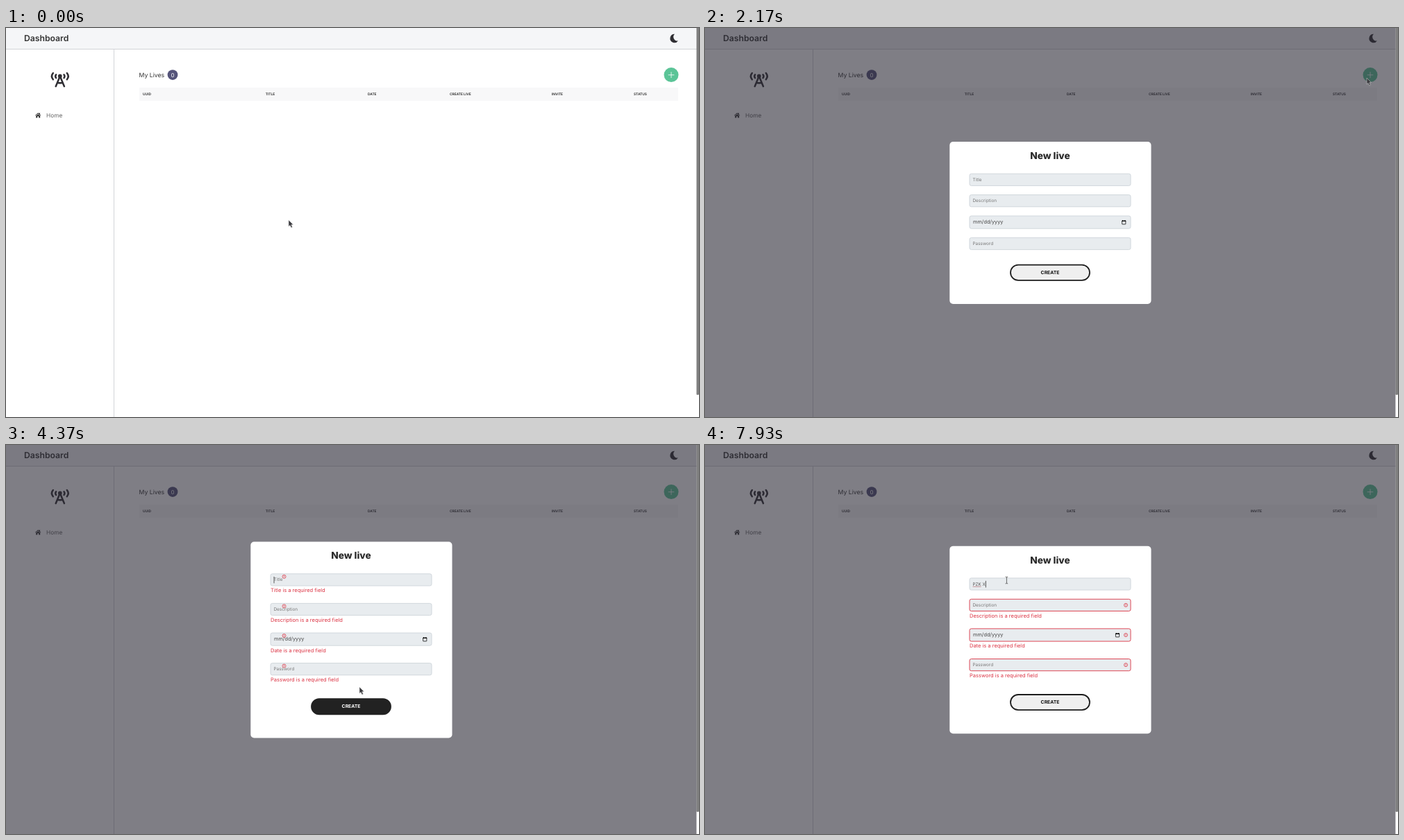
Animation of 998x561 px, one loop 8 s. Source, as an HTML page:

```html
<!DOCTYPE html>
<html lang="en">
<head>
<meta charset="utf-8">
<title>Dashboard</title>
<style>
  html, body { margin: 0; width: 100%; height: 100%; overflow: hidden; background: #fff; }
  svg { display: block; width: 100vw; height: 100vh; }
  text { font-family: Inter, "Open Sans", sans-serif; white-space: pre; text-rendering: geometricPrecision; }
  .list text { font-family: "DejaVu Sans", sans-serif; }
  .list rect { filter: drop-shadow(0 1px 1.5px rgba(0, 0, 0, .3)); }
</style>
</head>
<body>
<svg id="stage" viewBox="0 0 998 561" preserveAspectRatio="none"></svg>
<script>
const LOOP = 8000, OPEN = 2170, SUBMIT = 4370, TYPE = 6730, FADE = 400;
const INK = '#333', RED = '#dc3545', LINE = '#cdd4da';
const stage = document.getElementById('stage');

function add(parent, tag, attrs = {}, content) {
  const node = document.createElementNS('http://www.w3.org/2000/svg', tag);
  set(node, attrs);
  if (content !== undefined) node.textContent = content;
  parent.append(node);
  return node;
}
function set(node, attrs) {
  for (const key in attrs) node.setAttribute(key, attrs[key]);
}
const group = (parent, attrs) => add(parent, 'g', attrs);
const box = (parent, x, y, width, height, fill, more) =>
  add(parent, 'rect', { x, y, width, height, fill, ...more });
const path = (parent, d, attrs) => add(parent, 'path', { d, fill: 'none', ...attrs });
const label = (parent, x, y, size, str, fill = INK, weight = 400, more) =>
  add(parent, 'text', { x, y, 'font-size': size, 'font-weight': weight, fill, ...more }, str);
const show = (node, on) => { node.style.display = on ? '' : 'none'; };
const move = (node, x, y) => node.setAttribute('transform', `translate(${x} ${y})`);
const mix = (a, b, k) => `color-mix(in srgb, ${a}, ${b} ${k * 100}%)`;
const lerp = (a, b, k) => a + (b - a) * k;
const progress = (t, from, span = FADE) => Math.min(1, Math.max(0, (t - from) / span));
const ease = k => k * k * (3 - 2 * k);

// Page
box(stage, 0, 0, 998, 561, '#fff');
box(stage, 0, 0, 995, 30, '#f5f6f8');
box(stage, 0, 30, 995, 1, '#d3d4d8');
box(stage, 155, 31, 1, 530, '#d3d4d8');
label(stage, 26, 19.2, 12.2, 'Dashboard', INK, 600);
path(stage, 'M963 8.8A6.2 6.2 0 1 0 967.8 18.4A5.6 5.6 0 0 1 963 8.8Z', { fill: '#2f2e33' });

const tower = group(stage, { stroke: '#2f2e33', 'stroke-width': 2.5, 'stroke-linecap': 'round' });
for (const side of [-1, 1]) {
  const half = group(tower, { transform: `translate(77.8 69.6) scale(${side} 1)` });
  path(half, 'M10 -4.6Q13.8 0 10 4.6M5.7 -2.4Q7.6 0 5.7 2.4');
  path(half, 'M0 0L6.1 14.6M0 9.6H4');
}
add(tower, 'circle', { cx: 77.8, cy: 69.4, r: 1.6, fill: '#2f2e33' });

path(stage, 'M42 126L46.2 122.2L47.8 123.6V122.6H49V124.7L50.4 126L49.8 126.6L46.2 123.5L42.6 126.6Z', { fill: INK });
path(stage, 'M43.2 126.8L46.2 124.2L49.2 126.8V129.4H47.1V127.3H45.3V129.4H43.2Z', { fill: INK });
label(stage, 58, 129, 8.3, 'Home', '#666');

label(stage, 191.6, 71, 8.7, 'My Lives');
add(stage, 'circle', { cx: 240, cy: 67.6, r: 7.4, fill: '#55547a' });
label(stage, 240, 70.5, 8, '0', '#fff', 400, { 'text-anchor': 'middle' });
const plus = add(stage, 'circle', { cx: 958, cy: 67.6, r: 10.5 });
path(stage, 'M953.7 67.7H962.3M958 63.4V72', { stroke: '#fff', 'stroke-width': .8 });
box(stage, 192, 86, 776, 19, '#f8f8f9');
[['UUID', 197], ['TITLE', 373.8], ['DATE', 521], ['CREATE LIVE', 639], ['INVITE', 786], ['STATUS', 904]]
  .forEach(([str, x]) => label(stage, x, 97.3, 4.85, str, '#222', 600));
box(stage, 994.4, -4, 3.6, 533, '#7f7f7f', { rx: 1 });

// Dialog
const dialog = group(stage);
box(dialog, 0, 0, 994.4, 561, 'rgb(42,40,52)', { opacity: .6 });
const panel = box(dialog, 352.3, 0, 290.2, 0, '#fff', { rx: 5 });
const heading = label(dialog, 497, 0, 13.7, 'New live', '#2b2b2b', 800, { 'text-anchor': 'middle' });

const fields = ['Title', 'Description', 'Date', 'Password'].map((name, i) => {
  const g = group(dialog), isDate = i === 2, h = isDate ? 18.2 : 17.2;
  const glow = box(g, 380.3, -.7, 233.4, h + 1.4, 'none', { rx: 3, stroke: RED, 'stroke-width': 1.2 });
  const frame = box(g, 381, 0, 232, h, '#e8ecef', { rx: 2.5, 'stroke-width': .9 });
  const hint = isDate
    ? label(g, 386, 11.3, 7.3, 'mm/dd/yyyy', '#484848')
    : label(g, 385.5, 10.7, 6.4, name, '#777');
  const picker = isDate && group(g);
  if (picker) {
    box(picker, -2.6, -2.3, 5.2, 5, 'none', { stroke: '#111', 'stroke-width': .8, rx: .4 });
    path(picker, 'M-3 -1.8H3M-1.7 -3.3V-2M1.7 -3.3V-2', { stroke: '#111', 'stroke-width': 1.1 });
  }
  const icon = group(g, { stroke: RED, 'stroke-width': .8 });
  add(icon, 'circle', { r: 2.5, fill: 'none' });
  path(icon, 'M0 -1.4V.3M0 .8V1.4');
  const error = label(g, 381, h + 9.4, 7.5, name + ' is a required field', RED);
  return { g, h, glow, frame, hint, picker, icon, error, y: 0 };
});

const entry = label(fields[0].g, 385.5, 10.9, 6.3, '', '#555');
const squiggle = path(fields[0].g, '', { stroke: '#a8545c', 'stroke-width': .6 });
const caret = box(fields[0].g, 385.6, 4, .8, 9.6, '#333');

const button = group(dialog);
const pill = box(button, 440, .9, 114, 22.2, '#efefef', { rx: 11.1, stroke: '#1c1c1c', 'stroke-width': 1.8 });
const caption = label(button, 497, 14.3, 6.8, 'CREATE', '#111', 700, { 'text-anchor': 'middle' });

const list = group(dialog, { class: 'list' });
box(list, 381, 209.4, 232, 45.6, '#fff', { rx: 1.5 });
label(list, 387.3, 225.5, 7.2, 'Procurando dois Moinhos', '#222');
label(list, 387.3, 244.1, 7.2, 'Pelunto - Volume 1', '#222');

// Pointer
const arrow = path(stage, 'M0 0V9.2L2 7.4L3.7 11L5.4 10.2L3.8 6.8L6.5 6.5Z',
  { fill: '#3c3c40', stroke: '#d8d8d8', 'stroke-width': .5 });
const beam = path(stage, 'M-1.8 -4.8H-.5L0 -4.4L.5 -4.8H1.8M0 -4.4V4.4M-1.8 4.8H-.5L0 4.4L.5 4.8H1.8',
  { stroke: '#444', 'stroke-width': .8 });

// start, end, then the four points of a curve
const moves = [
  [30, 830, 407, 277, 520, 345, 760, 328, 883, 199],
  [970, 1560, 883, 199, 910, 165, 940, 100, 953, 72],
  [2930, 3230, 953, 72, 800, 130, 610, 250, 501, 305],
  [3470, 3630, 501, 305, 502, 311, 504, 317, 506, 323],
  [3630, 3900, 506, 323, 508, 332, 509, 342, 509, 349],
  [4930, 5200, 509, 349, 490, 315, 462, 285, 447, 256],
  [5200, 5330, 447, 256, 442, 244, 436, 232, 433, 220],
  [5330, 5530, 433, 220, 432, 210, 434, 203, 434.4, 195]
];
const typed = [[TYPE, 'P'], [6930, 'PZ'], [7130, 'PZK'], [7670, 'PZK '], [7930, 'PZK X']];
const blinks = [[SUBMIT, 4870], [5370, 6170], [TYPE, LOOP]];

function pointerAt(t) {
  const m = moves.findLast(s => t >= s[0]) || moves[0];
  const raw = progress(t, m[0], m[1] - m[0]);
  const k = m[1] - m[0] > 290 ? ease(raw) : raw, j = 1 - k;
  const at = i => j ** 3 * m[i] + 3 * j * j * k * m[i + 2] + 3 * j * k * k * m[i + 4] + k ** 3 * m[i + 6];
  return [at(2), at(3)];
}

function layout(t) {
  const failed = fields.map((f, i) => t >= SUBMIT && !(i === 0 && t >= TYPE));
  const height = 234 + 12.2 * failed.filter(Boolean).length;
  const top = 281 - height / 2;
  set(panel, { y: top, height });
  heading.setAttribute('y', top + 24.8);
  let y = top + 46.2;
  fields.forEach((f, i) => {
    f.y = y;
    move(f.g, 0, y);
    show(f.error, failed[i]);
    show(f.icon, failed[i]);
    y += f.h + 13.2 + (failed[i] ? 12.2 : 0);
  });
  move(button, 0, y + 8);
}

function drawFields(t) {
  const k = ease(progress(t, SUBMIT));
  const cleared = ease(progress(t, TYPE));
  fields.forEach((f, i) => {
    const red = i ? k : k * (1 - cleared);
    f.frame.style.stroke = mix(LINE, RED, red);
    f.glow.style.opacity = i ? 0 : red * .3;
    move(f.icon, lerp(400.5, 606, k), lerp(4, f.h / 2, k));
    if (f.picker) move(f.picker, lerp(603.2, 594, k), 9.3);
  });

  const step = typed.findLast(s => t >= s[0]);
  const str = step ? step[1] : '';
  if (entry.textContent !== str) entry.textContent = str;
  const end = str ? entry.getComputedTextLength() : 0;
  caret.setAttribute('x', 385.6 + end);
  show(caret, blinks.some(([from, to]) => t >= from && t < to));
  show(fields[0].hint, !str);
  show(squiggle, t >= 7670);
  if (str.length > 3) squiggle.setAttribute('d', `M385.5 12.4H${385.5 + entry.getSubStringLength(0, 3)}`);
  show(list, t >= TYPE && t < 6930);
}

function drawButtons(t) {
  plus.style.fill = mix('#5bc497', '#26a579', t < OPEN ? ease(progress(t, 1370)) : 0);
  const dark = ease(progress(t, 3770)) - ease(progress(t, SUBMIT));
  pill.style.fill = mix('#efefef', '#222', dark);
  pill.style.stroke = mix('#1c1c1c', '#222', dark);
  caption.style.fill = mix('#111', '#fff', dark);
}

function drawPointer(t) {
  const [x, y] = pointerAt(t);
  const over = t >= OPEN && x > 381 && x < 613 && fields.some(f => y >= f.y && y <= f.y + f.h);
  show(arrow, !over);
  show(beam, over);
  move(over ? beam : arrow, x, y);
}

function render(t) {
  show(dialog, t >= OPEN);
  layout(t);
  drawFields(t);
  drawButtons(t);
  drawPointer(t);
}

const began = performance.now();
function tick() {
  render((performance.now() - began) % LOOP);
  requestAnimationFrame(tick);
}
tick();
</script>
</body>
</html>
```
